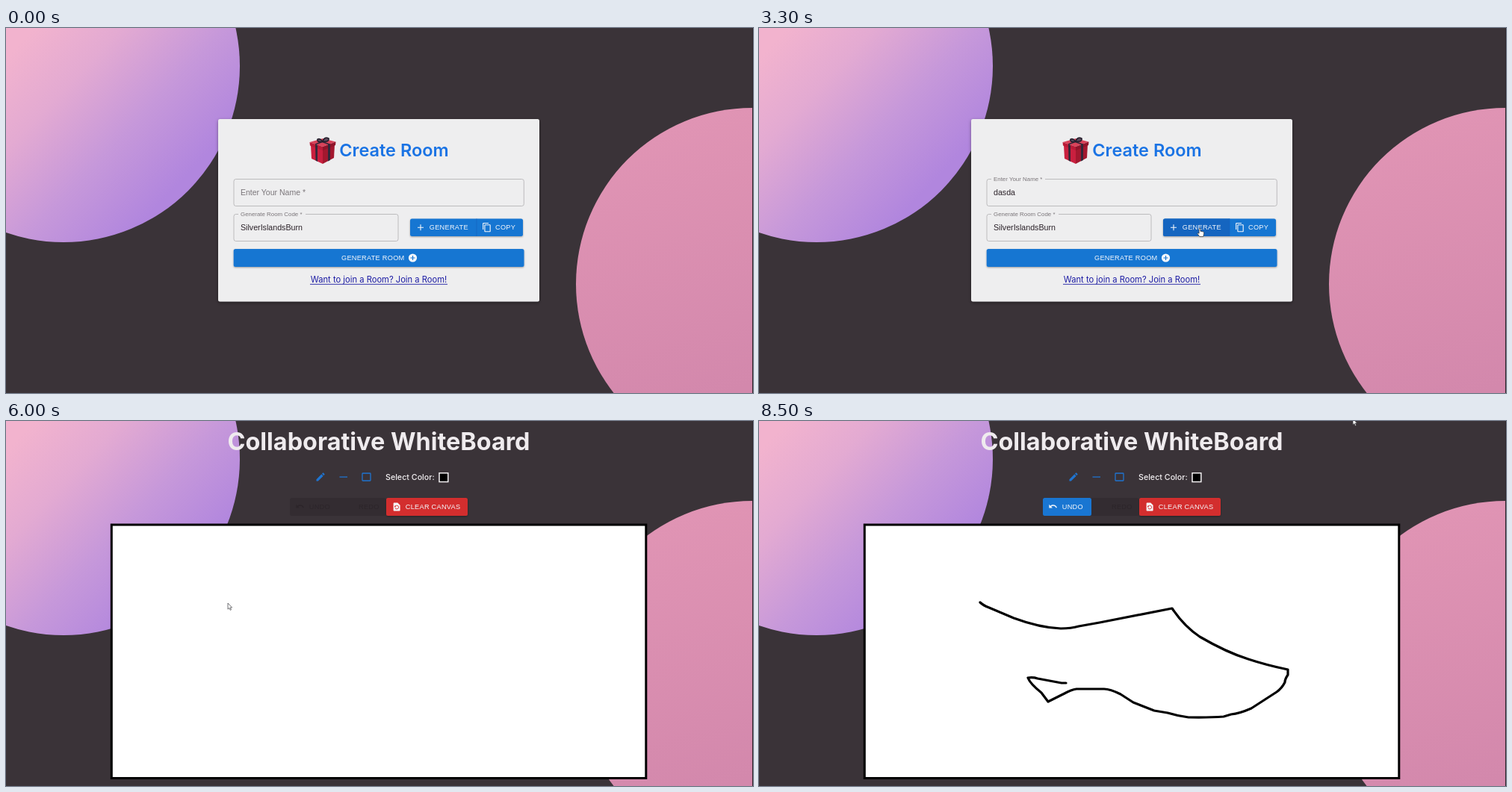
These frames come from a looping animation (1000x489 px, 8900 ms). An HTML page:

```html
<!DOCTYPE html>
<html lang="en">
<head>
<meta charset="utf-8">
<title>Create Room</title>
<style>
  html, body { margin: 0; width: 100%; height: 100%; overflow: hidden; background: #3a3338; }
  svg { display: block; width: 100%; height: 100%; }
  text { font-family: "Liberation Sans", Arial, sans-serif; white-space: pre; }
  .geo { font-family: Inter, sans-serif; }
  .btn { font-size: 9.2px; letter-spacing: .27px; fill: #f4f7fb; }
  .value { font-size: 10.67px; fill: #2b2229; }
  .label { font-size: 7.9px; fill: #7a7579; }
  .field { fill: none; stroke: #b7b6b8; stroke-width: .9; }
  .blue { fill: #1976d2; }
  .white { fill: #f6f8fb; }
  .off { fill: #000; fill-opacity: .13; }
  .tool { fill: none; stroke: #1f74cf; stroke-width: 1.3; }
</style>
</head>
<body>
<svg viewBox="0 0 1000 489">
  <defs>
    <linearGradient id="lilac" gradientUnits="userSpaceOnUse" x1="20" y1="20" x2="225" y2="215">
      <stop offset="0" stop-color="#f2b3ce"/>
      <stop offset=".3" stop-color="#e3aad2"/>
      <stop offset=".65" stop-color="#c698da"/>
      <stop offset="1" stop-color="#b186de"/>
    </linearGradient>
    <linearGradient id="rose" gradientUnits="userSpaceOnUse" x1="840" y1="150" x2="960" y2="489">
      <stop offset="0" stop-color="#e094b4"/>
      <stop offset="1" stop-color="#d388ac"/>
    </linearGradient>
    <filter id="soft" x="-10%" y="-10%" width="120%" height="130%">
      <feDropShadow dx="0" dy="1.5" stdDeviation="2" flood-color="#000" flood-opacity=".4"/>
    </filter>
    <filter id="lift" x="-5%" y="-20%" width="110%" height="180%">
      <feDropShadow dx="0" dy="1" stdDeviation="1" flood-color="#000" flood-opacity=".35"/>
    </filter>
  </defs>

  <rect width="1000" height="489" fill="#3a3338"/>
  <circle cx="77" cy="51" r="236" fill="url(#lilac)"/>
  <circle cx="999" cy="343" r="236" fill="url(#rose)"/>
  <rect x="999" width="1" height="489" fill="#2b2429"/>

  <g id="form">
    <rect x="284" y="122" width="430" height="244.5" rx="2.5" fill="#eeeeef" filter="url(#soft)"/>
    <g id="gift">
      <path d="M408 157L424 162V182L409 175Z" fill="#c9203f"/>
      <path d="M424 162L440 156L439 174L424 182Z" fill="#a3182f"/>
      <path d="M406.500 153L424 148L441.500 152.500L424 159Z" fill="#d8435a"/>
      <path d="M406.500 153L424 159V164L407 157.500Z" fill="#b91b37"/>
      <path d="M424 159L441.500 152.500L441 157L424 164Z" fill="#8f142a"/>
      <path d="M414 156L417 157V179L414.500 177.500ZM431 156L434 155V177L431 178.500Z" fill="#34283a"/>
      <path d="M414 156L431 149.500M417 150L433 156" stroke="#34283a" stroke-width="1.800"/>
      <path d="M424 152Q416 154 417 149Q420 147 424 152Q426 145 432 148Q433 153 424 152Z" fill="#5b4a5c" stroke="#231d2b" stroke-width="1.500"/>
    </g>
    <text class="geo" x="519.500" y="172" text-anchor="middle" font-size="23.500" font-weight="600" fill="#1a73e4">Create Room</text>

    <rect id="nameBox" class="field" x="305" y="202.500" width="388.300" height="36" rx="2.700"/>
    <rect id="nameGap" x="311" y="201" width="72" height="3" fill="#eeeeef"/>
    <text id="nameLabel" class="label" x="314">Enter Your Name *</text>
    <text id="name" class="value" x="314" y="224"></text>
    <rect id="caret" y="214.500" width=".9" height="12" fill="#2b2229"/>

    <rect class="field" x="305" y="249.500" width="220" height="36" rx="2.700"/>
    <rect x="311" y="248" width="90" height="3" fill="#eeeeef"/>
    <text class="label" x="314" y="252.200">Generate Room Code *</text>
    <text id="code" class="value" x="314" y="271"></text>

    <rect class="blue" x="541" y="255.500" width="151" height="23.500" rx="2.500" filter="url(#lift)"/>
    <path id="genHover" d="M543.500 255.500H630V279H543.500Q541 279 541 276.500V258Q541 255.500 543.500 255.500Z" fill="#1565c0"/>
    <path d="M630 255.500V279" stroke="#1565c0" stroke-width=".7"/>
    <path d="M551 267.300H559M555 263.300V271.300" stroke="#f4f7fb" stroke-width="1.100"/>
    <text class="btn" x="566.800" y="270.300">GENERATE</text>
    <path class="white" transform="translate(637 260.400) scale(.56)" d="M16 1H4c-1.100 0-2 .9-2 2v14h2V3h12V1zm3 4H8c-1.100 0-2 .9-2 2v14c0 1.100.9 2 2 2h11c1.100 0 2-.9 2-2V7c0-1.100-.9-2-2-2zm0 16H8V7h11v14z"/>
    <text class="btn" x="655" y="270.300">COPY</text>

    <rect id="roomBtn" x="304.700" y="296" width="388.800" height="24" rx="2.500" filter="url(#lift)"/>
    <text class="btn" x="449" y="311.300">GENERATE ROOM</text>
    <circle class="white" cx="544.500" cy="308" r="5.600"/>
    <path d="M541.500 308H547.500M544.500 305V311" stroke="#1976d2" stroke-width="1.200"/>

    <text class="geo" x="499" y="341.200" text-anchor="middle" font-size="11.200" fill="#1c1ca4">Want to join a Room? Join a Room!</text>
    <path d="M407 343.300H591" stroke="#1c1ca4" stroke-width=".9"/>
  </g>

  <g id="board">
    <text class="geo" x="499" y="39" text-anchor="middle" font-size="32.400" font-weight="700" fill="#efebee">Collaborative WhiteBoard</text>
    <path transform="translate(413.600 67.500) scale(.62)" fill="#1f74cf" d="M3 17.250V21h3.750L17.810 9.940l-3.750-3.750L3 17.250zM20.710 7.040c.39-.39.39-1.020 0-1.410l-2.340-2.340c-.39-.39-1.020-.39-1.410 0l-1.830 1.830 3.750 3.750 1.830-1.830z"/>
    <path class="tool" d="M446.500 75H457"/>
    <rect class="tool" x="477" y="70" width="11" height="10" rx=".8"/>
    <text class="geo" x="508" y="78.500" font-size="10.700" font-weight="500" fill="#f3f0f2">Select Color:</text>
    <rect x="580" y="69.700" width="11.800" height="11.800" fill="#000" stroke="#f3f0f2" stroke-width="1.500"/>

    <rect class="off" x="380" y="103" width="128.500" height="24" rx="2.500"/>
    <text class="btn" x="472" y="118.300" style="fill:#2c252a">REDO</text>
    <rect id="undoBtn" x="380" y="103" width="65" height="24" rx="2.500"/>
    <g id="undoFace">
      <path transform="translate(387.300 108.200) scale(.52)" d="M12.500 8c-2.650 0-5.050.99-6.900 2.600L2 7v9h9l-3.620-3.620c1.390-1.160 3.160-1.880 5.120-1.880 3.540 0 6.550 2.310 7.600 5.500l2.370-.78C21.080 11.030 17.150 8 12.500 8z"/>
      <text class="btn" x="405.800" y="118.300" style="fill:inherit">UNDO</text>
    </g>
    <rect x="509" y="103" width="109" height="24" rx="2.500" fill="#d32f2f" filter="url(#lift)"/>
    <path class="white" transform="translate(516.400 108.300) scale(.56)" d="M14 2H6c-1.100 0-1.990.9-1.990 2L4 20c0 1.100.89 2 1.990 2H18c1.100 0 2-.9 2-2V8l-6-6zm-2 16c-2.050 0-3.810-1.240-4.580-3h1.710c.63.9 1.680 1.500 2.870 1.500 1.930 0 3.500-1.570 3.500-3.500S13.930 9.500 12 9.500c-1.350 0-2.520.78-3.100 1.900l1.600 1.600h-4V9l1.300 1.300C8.690 8.920 10.230 8 12 8c2.760 0 5 2.240 5 5s-2.240 5-5 5z"/>
    <text class="btn" x="534.800" y="118.300">CLEAR CANVAS</text>

    <rect x="141.300" y="139" width="715.500" height="339.500" fill="#fff" stroke="#000" stroke-width="3"/>
    <path id="ink" fill="none" stroke="#000" stroke-width="3.200" stroke-linecap="round" stroke-linejoin="round"/>
  </g>

  <g id="pointer">
    <path id="arrow" d="M0 0V8.200L1.900 6.500L3.200 9.400L4.500 8.800L3.200 6H5.600Z" fill="#fff" stroke="#3c3c40" stroke-width=".7"/>
    <path id="hand" d="M-.9 .6Q0-.7.9.6V4.200L4.800 5.100Q6 5.600 5.700 7L4.700 11.500H-.2L-3 7.500Q-3 6-.9 7.200Z" fill="#fff" stroke="#333" stroke-width=".7"/>
    <path id="beam" d="M-1.800-5H1.800M0-5V5M-1.800 5H1.800" stroke="#333" stroke-width=".8"/>
  </g>
</svg>
<script>
const LOOP = 8900, STEP = 100;
const $ = id => document.getElementById(id);
const show = (id, on) => { $(id).style.display = on ? '' : 'none'; };
const set = (id, attrs) => { for (const k in attrs) $(id).setAttribute(k, attrs[k]); };

// Linear reading of rows [time, ...values]
function track(rows, t) {
  if (t <= rows[0][0]) return rows[0].slice(1);
  for (let i = 1; i < rows.length; i++) {
    const a = rows[i - 1], b = rows[i];
    if (t <= b[0]) {
      const k = (t - a[0]) / (b[0] - a[0]);
      return a.slice(1).map((v, j) => v + (b[j + 1] - v) * k);
    }
  }
  return rows[rows.length - 1].slice(1);
}
// Last value whose time has come
const latest = (rows, t) => rows.filter(r => r[0] <= t).pop()[1];

const typed = [[0, ''], [1500, 'd'], [1600, 'da'], [1700, 'das'], [1800, 'dasd'], [2100, 'dasda']];
const codes = [[0, 'SilverIslandsBurn'], [3400, 'CurvyDogsGreet']];
const shapes = [[0, ''], [400, 'beam'], [1500, ''], [2400, 'beam'], [2700, 'arrow'], [2900, 'hand'],
  [3800, 'arrow'], [3900, 'hand'], [4100, 'arrow'], [4300, 'hand'], [5500, 'arrow']];
const moves = [[400, 520, 236], [700, 430, 221], [2400, 452, 224], [2700, 533, 244], [3000, 589, 267],
  [3300, 590, 268], [3600, 590, 268], [4100, 577, 322], [4500, 564, 309], [5000, 562, 308],
  [5700, 562, 308], [6000, 297, 244]];
const leave = [[7700, 411, 351], [8500, 795, -3]];

const ink = $('ink');
const head = 'M296 243Q300 247 308 250L341 264Q376 277 404 278Q418 278 428 275L456 270L553 251' +
  'Q569 275 590 289Q626 310 655 319Q679 327 708 333V340Q704 346 704 350Q700 358 693 363L659 385' +
  'Q643 392 632 393L622 396Q604 397.500 575 397Q560 395 547 391L529 388L501 377L484 366Q470 359 462 359H435';
const tail = 'H425Q418 360 409 365L387 376L378 364Q363 352 360 344Q367 343 373 345L405 351H411';
ink.setAttribute('d', head);
const mid = ink.getTotalLength();
ink.setAttribute('d', head + tail);
const full = ink.getTotalLength();
const strokes = [[6000, 0], [7000, mid], [7500, full]];

function pointerAt(t, drawn) {
  if (t <= 6000) return track(moves, t);
  if (t >= 7700) return track(leave, t);
  const p = ink.getPointAtLength(Math.min(full, drawn + 14));
  return [p.x, p.y + 1];
}

function draw(t) {
  const onBoard = t >= 5500;
  show('form', !onBoard);
  show('board', onBoard);

  const focus = t >= 500 && t < 3200;
  const rise = track([[500, 0], [700, 1]], t)[0];
  set('nameBox', { style: focus ? 'stroke:#2f77c2;stroke-width:1.4' : '' });
  set('nameLabel', {
    y: 224 - 18.8 * rise,
    style: `font-size:${10.5 - 2.6 * rise}px;fill:${focus ? '#3b7cc4' : '#7a7579'}`
  });
  show('nameGap', rise > 0);
  $('name').textContent = latest(typed, t);
  $('code').textContent = latest(codes, t);
  show('caret', focus && rise === 1);
  if (!onBoard) set('caret', { x: 314.3 + $('name').getComputedTextLength() });
  show('genHover', t >= 2900 && t < 3800);
  set('roomBtn', { fill: t >= 3900 ? '#1565c0' : '#1976d2' });

  const drawn = track(strokes, t)[0];
  const inked = t > 6000;
  show('ink', inked);
  set('ink', { 'stroke-dasharray': `${drawn} ${full + 10}` });
  set('undoBtn', { fill: inked ? '#1976d2' : 'none' });
  set('undoFace', { fill: inked ? '#f4f7fb' : '#2c252a' });

  const shape = latest(shapes, t);
  for (const id of ['arrow', 'hand', 'beam']) show(id, id === shape);
  const [x, y] = pointerAt(t, drawn);
  set('pointer', { transform: `translate(${x} ${y})` });
}

const start = performance.now();
function tick() {
  const t = (performance.now() - start) % LOOP;
  draw(Math.floor(t / STEP) * STEP);
  requestAnimationFrame(tick);
}
tick();
</script>
</body>
</html>
```
